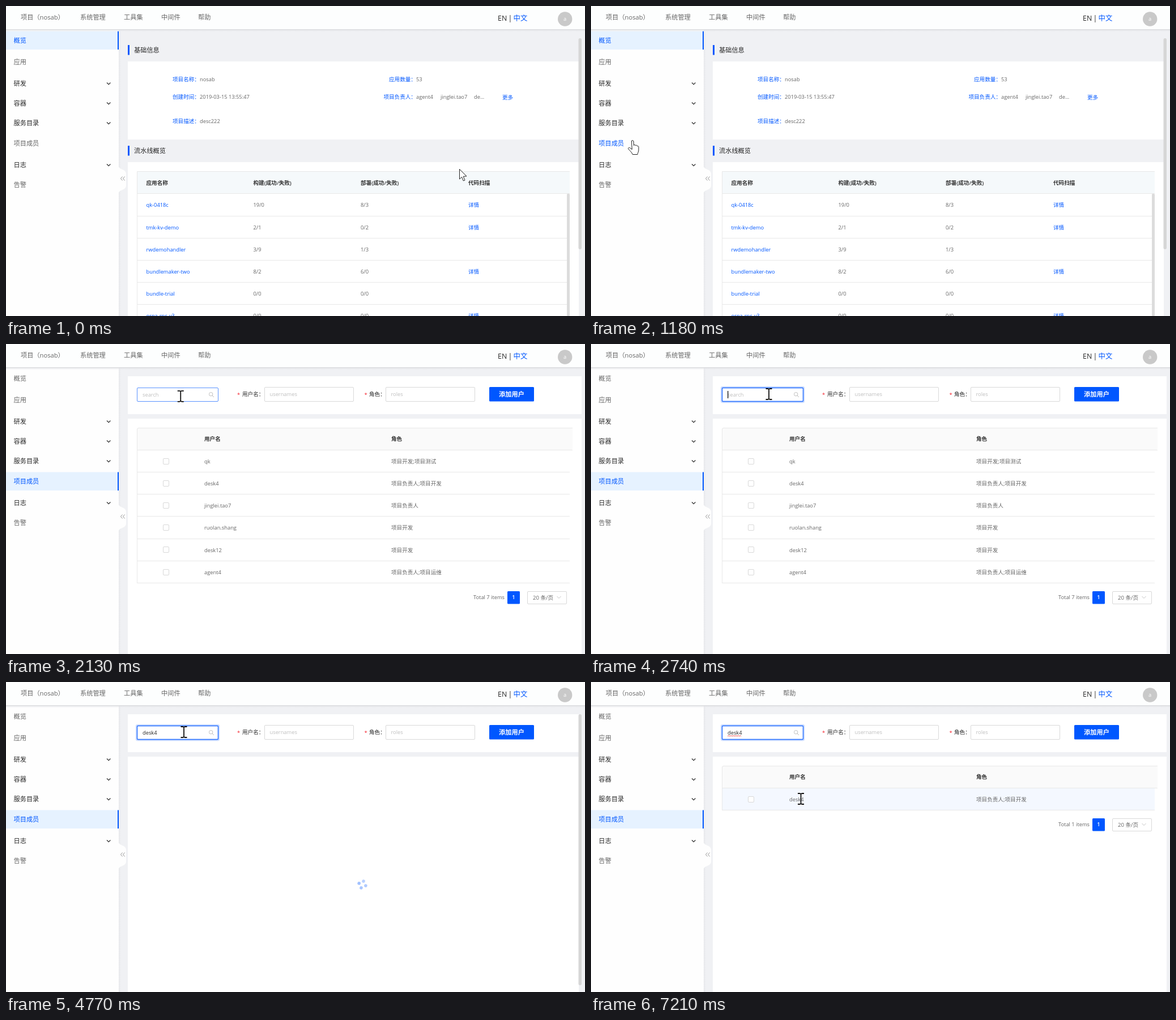
Recreate the animation shown at these times as an HTML page. Size 1022 px wide and 548 px high, loop 7.4 s.

```html
<!DOCTYPE html>
<html lang="zh-CN">
<head>
<meta charset="utf-8">
<title>项目成员搜索</title>
<style>
  html, body { margin: 0; width: 100%; height: 100%; overflow: hidden; background: #f0f1f4; }
  svg { display: block; }
  text {
    font: 9.6px "Open Sans", "Noto Sans", "Noto Sans CJK SC", "Noto Sans CJK", sans-serif;
    fill: #666; white-space: pre;
  }
  text.latin { font-size: 9.3px; }
  text.big { font-size: 11.2px; }
  text.lang { font-size: 12.4px; word-spacing: -1px; }
  text.dark { fill: #262626; }
  text.head { fill: #333; font-weight: 600; }
  text.link, .on text.big { fill: #0057ff; }
  text.hint { fill: #bfbfbf; }
  text.white { fill: #fff; font-weight: 600; }
  text.star { fill: #f5222d; }
  .line { fill: none; stroke: #e8e8e8; }
  .box { fill: #fff; stroke: #d9d9d9; }
  .chev { fill: none; stroke: #333; stroke-width: 1.3; }
  .mark { visibility: hidden; }
  .sel .mark { visibility: visible; }
  .cursor { fill: #fff; stroke: #222; stroke-width: 1; stroke-linejoin: round; }
</style>
</head>
<body>
<svg id="stage" width="1022" height="548" xmlns="http://www.w3.org/2000/svg"></svg>
<script>
const LOOP = 7400, ROW = 39.2, BLUE = '#0057ff', QUERY = 'desk4';

// Drawing helpers; text is placed by its vertical middle.
const rect = (x, y, w, h, fill, extra = '') =>
  `<rect x="${x}" y="${y}" width="${w}" height="${h}" fill="${fill}" ${extra}/>`;
const box = (x, y, w, h, extra = 'rx="1.5"') =>
  `<rect class="box" x="${x + .5}" y="${y + .5}" width="${w - 1}" height="${h - 1}" ${extra}/>`;
const path = (d, cls, extra = '') => `<path d="${d}" class="${cls}" ${extra}/>`;
const text = (x, y, s, cls = '', extra = '') => {
  const drop = /lang/.test(cls) ? 4.2 : /big/.test(cls) ? 4 : 3.3;
  const latin = /^[\x00-\x7f]*$/.test(s) ? ' latin' : '';
  return `<text x="${x}" y="${y + drop}" class="${cls}${latin}" ${extra}>${s}</text>`;
};
const group = (id, body, extra = '') => `<g id="${id}" ${extra}>${body}</g>`;
const hidden = 'visibility="hidden"';

function header() {
  const items = [[26, '项目（nosab）'], [131, '系统管理'], [208, '工具集'], [274, '中间件'], [339, '帮助']];
  return rect(0, 0, 1022, 41, '#fdfefe') + rect(0, 41, 1022, 5, 'url(#fall)') +
    items.map(([x, s]) => text(x, 20, s, 'big')).join('') +
    text(868, 22, 'EN | <tspan fill="' + BLUE + '">中文</tspan>', 'lang dark') +
    '<circle cx="986.7" cy="23" r="12.7" fill="#c9c9c9"/>' +
    text(986.7, 23, 'a', 'white', 'text-anchor="middle" style="font-weight:400"');
}

function sidebar() {
  const items = [['overview', 61, '概览'], ['apps', 99, '应用'], ['dev', 137, '研发', 1], ['pods', 172, '容器', 1],
    ['catalog', 207, '服务目录', 1], ['members', 243, '项目成员'], ['logs', 281, '日志', 1], ['alerts', 316, '告警']];
  return rect(199, 42, 4, 506, 'url(#side)') + rect(0, 42, 199, 506, '#fefefe') +
    path('M198 281C199 291 212 287 212 297V317C212 327 199 323 198 333Z', '', 'fill="#fefefe"') +
    path('M205.500 301.500L202.500 305L205.500 308.500M209.500 301.500L206.500 305L209.500 308.500', '',
      'fill="none" stroke="#888" stroke-width=".9"') +
    items.map(([id, y, s, fold]) => group(id,
      `<g class="mark">${rect(0, y - 16.5, 199, 32.5, '#e6f2ff')}${rect(197, y - 16.5, 2, 32.5, BLUE)}</g>` +
      text(13.5, y, s, fold ? 'big dark' : 'big') +
      (fold ? path(`M178 ${y - 1.5}L181.200 ${y + 1.700}L184.400 ${y - 1.500}`, 'chev') : ''))).join('');
}

function overview() {
  const title = (y, s) => rect(215, y - 9, 3, 17.5, BLUE) + text(226, y, s, 'big dark');
  const fields = [[294, 130, '项目名称：', 'nosab'], [676, 130, '应用数量：', '53'],
    [294, 161, '创建时间：', '2019-03-15 13:55:47'], [294, 204, '项目描述：', 'desc222']];
  const cols = [247.5, 436.5, 626, 816];
  const rows = [['qk-0418c', '19/0', '8/3', 1], ['tmk-kv-demo', '2/1', '0/2', 1], ['rwdemohandler', '3/9', '1/3'],
    ['bundlemaker-two', '8/2', '6/0', 1], ['bundle-trial', '0/0', '0/0'], ['orna-rpc-v3', '0/0', '0/0', 1]];
  return title(78, '基础信息') + rect(215, 98, 796, 138, '#fff') +
    fields.map(([x, y, k, v]) => text(x, y, k, 'link') + text(x + 48, y, v)).join('') +
    text(666.4, 161, '项目负责人：', 'link') + text(724, 161, 'agent4') +
    text(767, 161, 'jinglei.tao7') + text(826, 161, 'de...') + text(876, 162, '更多', 'link') +
    title(256, '流水线概览') + rect(215, 276, 796, 272, '#fff') +
    rect(231, 293, 764, 39, '#f5f9fb') + path('M995 292.500H231.500V548M231 331.500H995', 'line') +
    rect(232, 332, 758, ROW, '#f2f7ff', 'id="hoverA" ' + hidden) +
    ['应用名称', '构建(成功/失败)', '部署(成功/失败)', '代码扫描'].map((s, i) => text(cols[i], 313, s, 'head')).join('') +
    rows.map(([name, build, deploy, scan], i) => {
      const y = 352 + i * ROW;
      return text(cols[0], y, name, 'link') + text(cols[1], y, build) + text(cols[2], y, deploy) +
        (scan ? text(cols[3], y, '详情', 'link') : '') + path(`M231 ${Math.floor(y + 19) + .5}H990`, 'line');
    }).join('') + rect(990, 332, 5, 216, '#dcdcdc', 'rx="1.5"');
}

function form() {
  const field = (x, star, gap, label, hint) => text(star, 90, '*', 'star') + text(x - gap, 89, label, 'dark') +
    box(x, 76, 158, 26) + text(x + 9.5, 89, hint, 'hint');
  return rect(215, 57, 801, 67, '#fff') + box(231, 77, 144, 25, 'id="search" rx="1.5"') +
    `<rect id="glow" x="230.500" y="76.500" width="145" height="26" rx="2" fill="none" stroke="${BLUE}" stroke-width="3.500" opacity=".2"/>` +
    '<circle cx="361.700" cy="88.700" r="3.200" fill="none" stroke="#bfbfbf"/>' +
    path('M364 91L367 94', '', 'stroke="#bfbfbf"') +
    text(241, 90, 'search', 'hint', 'id="hint"') + text(241, 90, QUERY, 'dark', 'id="query"') +
    path('M241 96' + 'l1.500 -1.500l1.500 1.500'.repeat(8), '', 'id="wave" fill="none" stroke="#e33" stroke-width=".9"') +
    rect(241, 83, 1.3, 13, '#111', 'id="caret"') +
    field(456, 408, 39, '用户名：', 'usernames') + field(670, 632.5, 29, '角色：', 'roles') +
    rect(853, 76, 79, 25.5, BLUE, 'rx="1.5"') + text(892.5, 89, '添加用户', 'big white', 'text-anchor="middle"') +
    rect(215, 132, 801, 416, '#fff');
}

function memberTable(rows, total) {
  const end = 187 + rows.length * ROW, mid = end + 25.8;
  return rect(231, 148, 769, 39, '#fafafa', 'rx="3"') +
    path(`M1000 148.500H234Q231.500 148.500 231.500 151V${end}M231 187.500H1000`, 'line') +
    (total === 1 ? rect(232, 188, 763, ROW - 1, '#f4f8ff', 'id="hoverB" ' + hidden) : '') +
    text(350, 168, '用户名', 'head') + text(680, 168, '角色', 'head') +
    rows.map(([name, role], i) => {
      const y = 207.5 + i * ROW;
      return box(277, Math.round(y) - 6, 11, 11) + text(350, y, name) + text(680, y, role) +
        path(`M231 ${Math.floor(y + 19) + .5}H995`, 'line');
    }).join('') +
    text(825, mid, `Total ${total} items`) + rect(885, mid - 11, 22, 22.5, BLUE, 'rx="1.5"') +
    text(896, mid, '1', 'white', 'text-anchor="middle"') +
    box(920, Math.round(mid - 11), 70, 23) + text(930, mid + 1, '20 条/页') +
    path(`M972.500 ${mid - 2}L976 ${mid + 1.500}L979.500 ${mid - 2}`, '', 'fill="none" stroke="#c4c4c4"');
}

const dev = '项目开发', lead = '项目负责人';
const team = [['qk', dev + ';项目测试'], [QUERY, `${lead};${dev}`], ['jinglei.tao7', lead],
  ['ruolan.shang', dev], ['desk12', dev], ['agent4', lead + ';项目运维']];
const dots = [0, 1, 2, 3].map(i =>
  `<circle cx="6.200" r="2.800" fill="${BLUE}" opacity="${.28 + i * .03}" transform="rotate(${i * 90})"/>`).join('');

document.getElementById('stage').innerHTML =
  `<defs>
    <linearGradient id="fall" x2="0" y2="1"><stop stop-color="#d6d7da"/><stop offset="1" stop-color="#f0f1f4" stop-opacity="0"/></linearGradient>
    <linearGradient id="side"><stop stop-color="#e7e8eb"/><stop offset="1" stop-color="#f0f1f4"/></linearGradient>
  </defs>` + rect(0, 0, 1022, 548, '#f0f1f4') +
  group('home', overview()) + group('people', form()) +
  group('all', memberTable(team, 7)) + group('found', memberTable([team[1]], 1)) +
  group('scroll', rect(1011, 57, 5, 491, '#f0f1f4') + rect(1010.5, 57, 5.5, 373, '#d6d6d6', 'id="thumb" rx="2.700"')) +
  group('spin', dots) + sidebar() + header() +
  group('cursor',
    path('M.500 .500V18L4.500 14.300L7.300 21L10 19.900L7.200 13.300L13 12.900Z', 'cursor', 'id="arrow"') +
    path('M-1.500 1C-1.500 -.8 1.800 -.8 2 1L2.700 8.500C3.300 6.800 5.400 7 5.700 8.800C6.600 7.600 8.300 8 8.600 9.800C9.600 9 11 9.500 11.100 11.200L11 17C10.800 20 9.600 21.500 9 24.500H.500C-.8 21 -4 18.200 -6.800 15C-8.200 13 -6 11.400 -4.200 12.800L-.6 15.500Z',
      'cursor', 'id="hand"') +
    path('M-5.500 -9.500H-2L0 -8.700L2 -9.500H5.500M0 -8.700V8.700M-5.500 9.500H-2L0 8.700L2 9.500H5.500', '',
      'id="beam" fill="none" stroke="#111" stroke-width="1.800"'));

const $ = {};
document.querySelectorAll('[id]').forEach(el => $[el.id] = el);
const show = (el, on) => el.setAttribute('visibility', on ? 'visible' : 'hidden');
const display = (el, on) => el.style.display = on ? '' : 'none';
const between = (t, spans) => spans.some(([a, b]) => t >= a && t < b);

// Pointer strokes: start, end, number of steps, then a quadratic curve.
const strokes = [
  [0, 1, 2, [800, 288], [800, 288], [800, 288]],
  [110, 340, 4, [808, 300], [856, 364], [740, 320]],
  [420, 800, 6, [600, 292], [350, 262], [92, 242]],
  [880, 950, 2, [80, 240], [76, 239], [73, 238]],
  [1570, 1800, 4, [88, 232], [180, 170], [258, 123]],
  [1900, 2190, 5, [282, 110], [304, 95], [314, 88.5]],
  [5640, 5790, 3, [322, 108], [346, 146], [363.5, 181]],
  [5860, 6010, 3, [373, 199], [378, 208], [376, 204]],
  [6250, 6580, 5, [375, 202], [371, 197], [364.5, 196]],
  [7210, 7211, 2, [370.5, 206.5], [370.5, 206.5], [370.5, 206.5]]
];
function pointer(t) {
  const [a, b, n, p, q, r] = strokes.filter(s => s[0] <= t).pop();
  const u = Math.min(n - 1, Math.floor((t - a) / (b - a) * (n - 1) + 1e-6)) / (n - 1);
  return p.map((v, i) => v * (1 - u) ** 2 + 2 * q[i] * u * (1 - u) + r[i] * u * u);
}

const keyTimes = [3380, 3530, 3700, 3840, 4220];
const caretSpans = [[2670, 3150], [3380, 4770], [5240, 5770], [6330, 6880]];

function draw(t) {
  const [x, y] = pointer(t);
  const over = (l, top, r, b) => x >= l && x <= r && y >= top && y <= b;
  const home = t < 1260;
  const loading = between(t, [[1260, 1410], [4770, 4930]]);

  display($.home, home);
  display($.people, !home);
  display($.all, t >= 1410 && t < 4770);
  display($.found, t >= 4930);
  display($.scroll, home || loading);
  $.thumb.setAttribute('height', home ? 373 : 479);
  display($.spin, loading);
  $.spin.setAttribute('transform', `translate(629 358) rotate(${-71 + (t - 4770) * .3})`);

  $.overview.setAttribute('class', home ? 'sel on' : '');
  $.members.setAttribute('class', home ? (over(0, 227, 199, 259) && t >= 800 ? 'on' : '') : 'sel on');

  const inSearch = !home && over(231, 77, 375, 102);
  const focus = t >= 2600;
  $.search.style.stroke = focus ? '#2f76ff' : inSearch ? '#5a93ff' : '';
  $.search.style.strokeWidth = focus ? 1.4 : 1;
  display($.glow, focus);
  const typed = QUERY.slice(0, keyTimes.filter(k => k <= t).length);
  $.query.textContent = typed;
  display($.hint, !typed);
  display($.wave, t >= 5330);
  display($.caret, between(t, caretSpans));
  if (!home) $.caret.setAttribute('x', 241 + (typed ? $.query.getComputedTextLength() : 0));

  const inFound = t >= 4930 && over(231, 188, 995, 226);
  show($.hoverA, over(231, 332, 990, 371));
  show($.hoverB, inFound);

  const beam = inSearch || inFound && over(350, 202, 373, 213);
  const hand = x < 199;
  display($.beam, beam);
  display($.hand, hand);
  display($.arrow, !beam && !hand);
  $.cursor.setAttribute('transform', `translate(${x} ${y})`);
}

const start = performance.now();
function tick() {
  draw((performance.now() - start) % LOOP);
  requestAnimationFrame(tick);
}
tick();
</script>
</body>
</html>
```
